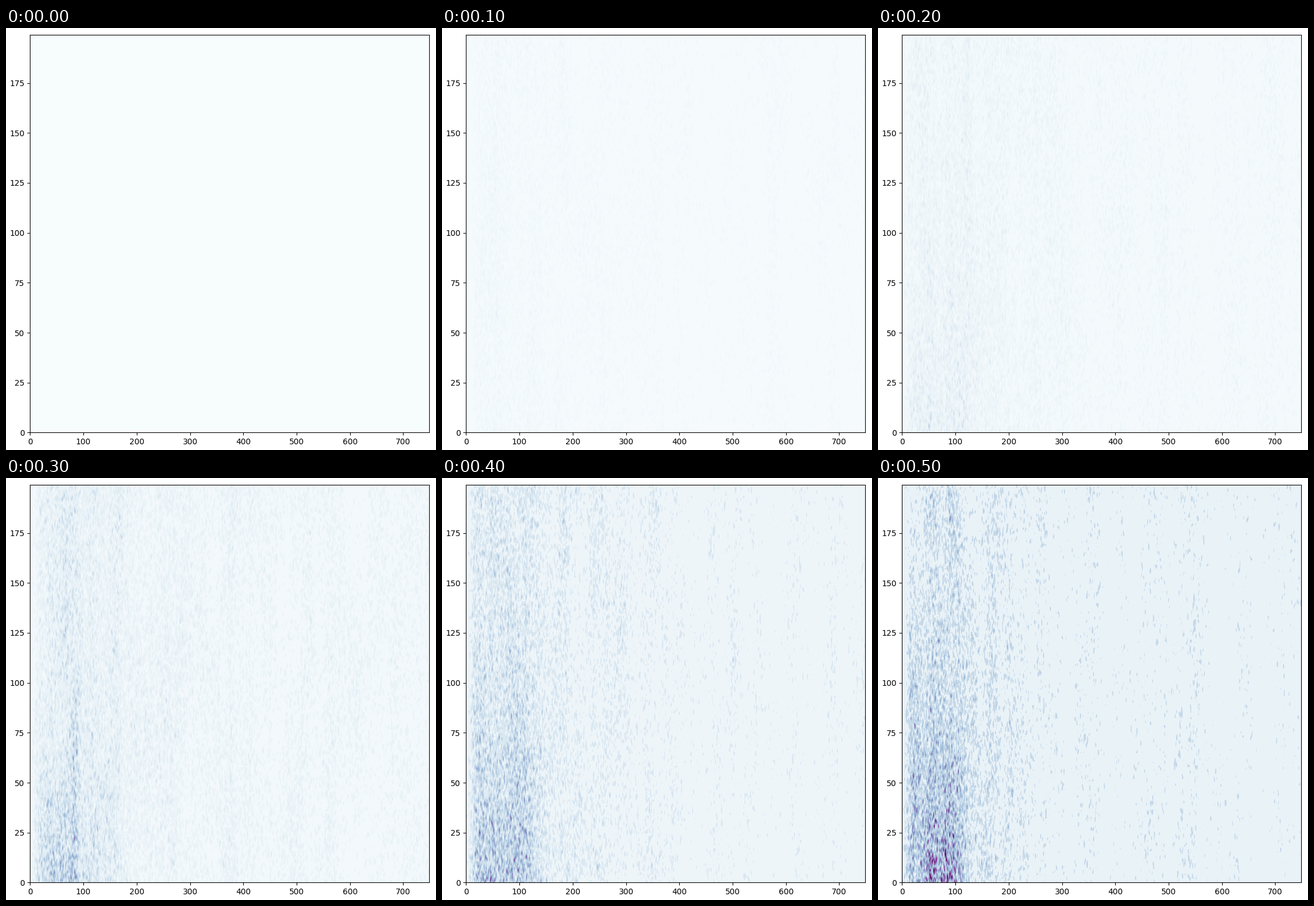
A matplotlib script that plays this animation: 756x741 px, repeating every 600 ms.

```python
import numpy as np
import matplotlib.pyplot as plt
from matplotlib.animation import FuncAnimation

W, H, DPI = 756, 741, 100
LEFT, RIGHT, TOP, BOTTOM = 42.4, 744.4, 12.4, 710.4
COLS, ROWS = 750, 200
PX_W, PX_H = 702, 698
FRAMES = 6

# Per step: uniform level, column-wide level, corner peak, contour spacing
FLOOR = [0, .0095, .017, .030, .040, .053]
COLUMN = [0, .007, .022, .033, .055, .057]
CORNER = [0, .003, .040, .100, .180, .260]
SPACING = [1, .02, .03, .05, .10, .15]
BANDS = [
    [],
    [45, 180, 510, 580, 690],
    [115, 240, 275, 430, 690],
    [85, 160, 280, 375, 515],
    [110, 240, 300, 345, 405, 500, 590, 690],
    [85, 165, 205, 345, 460, 550, 640],
]

x, y = np.meshgrid(np.arange(COLS), np.arange(ROWS))
cmap = plt.get_cmap("BuPu")


def smooth(a, sigma, axis):
    """Gaussian blur along one axis, wrapping at the ends."""
    freq = np.fft.fftfreq(a.shape[axis])
    gain = np.exp(-2 * (np.pi * sigma * freq) ** 2)
    shape = [1, 1]
    shape[axis] = -1
    return np.fft.ifft(np.fft.fft(a, axis=axis) * gain.reshape(shape), axis=axis)


def noise(rng, sigma_x, sigma_y):
    a = rng.normal(size=(ROWS, COLS)) + 1j * rng.normal(size=(ROWS, COLS))
    a = smooth(smooth(a, sigma_x, 1), sigma_y, 0)
    return a / a.real.std()


def field(step):
    """Speckle whose strength fades away from the lower left corner."""
    rng = np.random.default_rng(40 + step)
    speckle = np.abs(noise(rng, 0.8, 0.9))
    bands = 0.13 * noise(rng, 6, 30).real
    for center in BANDS[step]:
        bands += 0.2 * np.exp(-((x - center - 0.05 * (y - 100)) / 13) ** 2)
    rise = 1 - 0.75 * np.exp(-(x / 13) ** 2)
    column = np.exp(-(x / 230) ** 1.6)
    corner = np.exp(-(np.abs(x - 60) / 68) ** 2 - y / 58)
    strength = FLOOR[step] + COLUMN[step] * column + CORNER[step] * corner
    return strength * rise * np.exp(bands) * speckle


def resample(a, size, axis):
    pos = np.linspace(0, a.shape[axis] - 1, size)
    low = np.minimum(pos.astype(int), a.shape[axis] - 2)
    part = pos - low
    if axis == 0:
        part = part[:, None]
    return a.take(low, axis) * (1 - part) + a.take(low + 1, axis) * part


def render(step):
    """Filled contours, averaged over 2 x 2 samples per pixel."""
    if step == 0:
        return np.full((PX_H, PX_W, 3), cmap(0.0)[:3])
    z = resample(resample(field(step), 2 * PX_H, 0), 2 * PX_W, 1)
    gap = SPACING[step]
    middle = (np.floor(z / gap) + 0.5) * gap
    rgb = cmap(np.clip(middle, 0, 0.975))[..., :3]
    return rgb.reshape(PX_H, 2, PX_W, 2, 3).mean(axis=(1, 3))


fig = plt.figure(figsize=(W / DPI, H / DPI), dpi=DPI, facecolor="white")
ax = fig.add_axes([LEFT / W, 1 - BOTTOM / H, (RIGHT - LEFT) / W, (BOTTOM - TOP) / H])
image = ax.imshow(render(0), origin="lower", aspect="auto", interpolation="nearest",
                  extent=(0, COLS - 1, 0, ROWS - 1))
ax.set_xticks(range(0, 701, 100))
ax.set_yticks(range(0, 176, 25))


def update(step):
    image.set_data(render(step))
    return [image]


anim = FuncAnimation(fig, update, frames=FRAMES, interval=100, repeat=True, repeat_delay=0)
plt.show()
```
